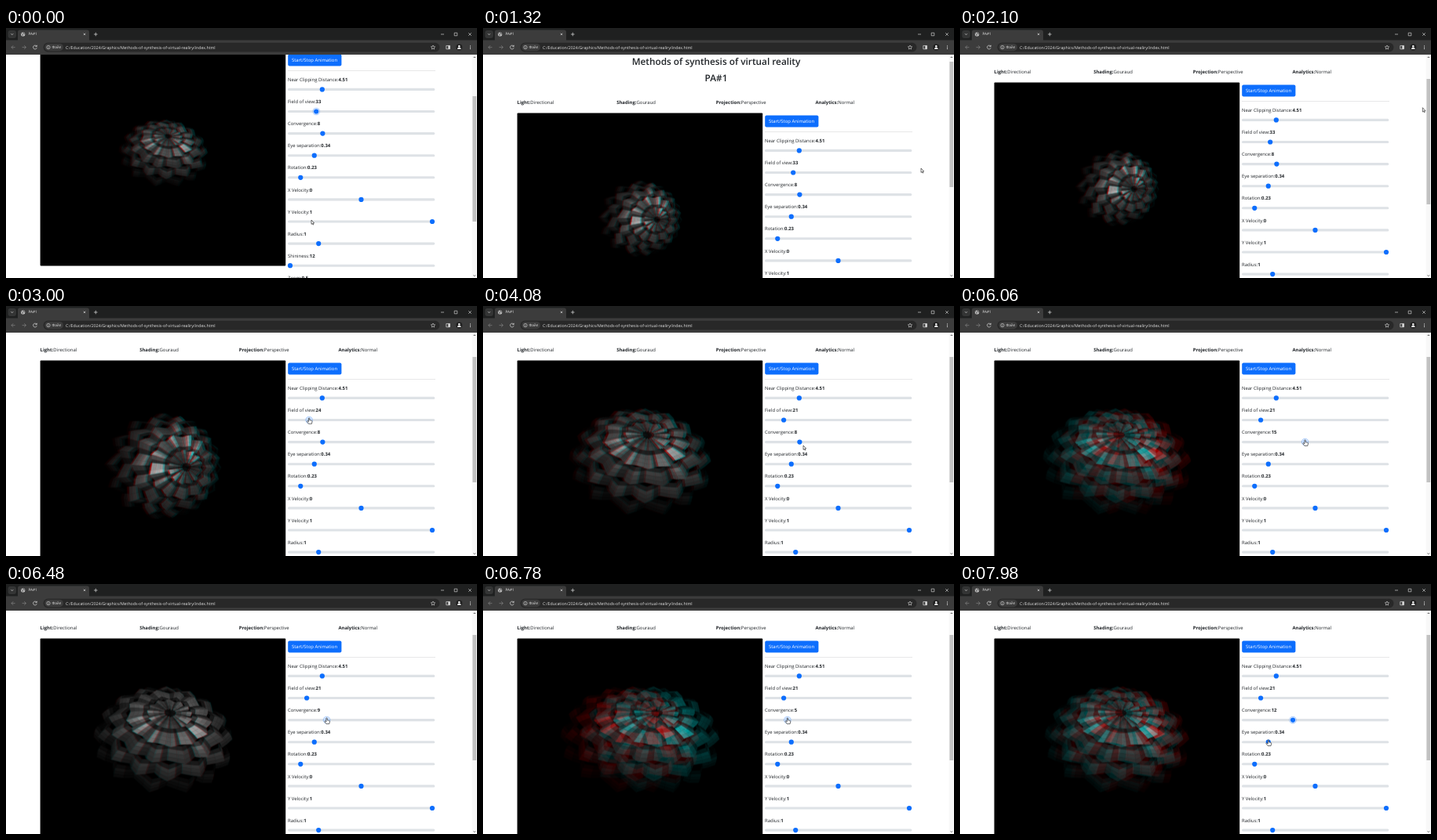
Recreate the animation shown at these times as an HTML page with a canvas. Size 600 by 319 pixels, loop 8000 ms.

```html
<!DOCTYPE html>
<html lang="en">
<head>
<meta charset="utf-8">
<title>PA#1</title>
<style>
html, body { margin: 0; width: 600px; height: 319px; overflow: hidden; background: #fff; }
body { position: relative; font: 5.95px "Open Sans", "Noto Sans", sans-serif; color: #212529; text-rendering: geometricPrecision; }
canvas, svg { position: absolute; left: 0; top: 0; }
#view { position: absolute; top: 34px; width: 600px; height: 285px; overflow: hidden; }
#page { position: absolute; top: -34px; }
.t { position: absolute; line-height: 0; white-space: pre; }
.t b { font-weight: 700; }
.head { width: 594px; text-align: center; font-size: 11.8px; font-weight: 600; }
.bar { color: #e3e3e3; font-size: 5.22px; }
.small { font-size: 4.7px; }
#tip { overflow: visible; }
#tip path { fill: #fff; stroke: #111; stroke-width: .6px; }
</style>
</head>
<body>
<canvas id="stage"></canvas>
<div id="view"><div id="page"></div></div>
<div id="chrome"></div>
<svg id="tip" width="1" height="1">
  <path id="arrow" d="M0 0V5.4L1.2 4.3L2.1 6.1L2.9 5.7L2.1 4H3.7Z"/>
  <path id="hand" d="M-.6 .1Q0-.6 .6 .1V2.6L3.3 3.2Q4 3.5 3.9 4.3L3.3 7.3H-.7L-2.8 4.3Q-2.6 3.3-1.7 3.8L-.6 4.7Z"/>
</svg>
<script>
const LOOP = 8000, W = 600, H = 319, TAU = Math.PI * 2;
const $ = id => document.getElementById(id);
const ctx = $('stage').getContext('2d');
const dpr = window.devicePixelRatio || 1;

function resize(canvas, w, h) {
  canvas.width = w * dpr;
  canvas.height = h * dpr;
  canvas.style.width = w + 'px';
  canvas.style.height = h + 'px';
}
resize($('stage'), W, H);

// --- timing ---------------------------------------------------------------
const within = (t, a, b) => t >= a && t < b;
const mix = (a, b, u) => a + (b - a) * u;
function ease(t, a, b) {
  const u = Math.min(1, Math.max(0, (t - a) / (b - a)));
  return u * u * (3 - 2 * u);
}

const scrollAt = t => 78 * (1 - ease(t, 780, 1260)) + 39 * ease(t, 1640, 2040);
const fovAt = t => Math.round(33 - 9 * ease(t, 2560, 3000) - 3 * ease(t, 3040, 3440));
const poseAt = t => ease(t, 240, 1140) - ease(t, 3000, 3480);
const swing = [[4440, 8], [4900, 15], [5360, 34], [6060, 15], [6780, 5], [7520, 12]];
function convAt(t) {
  let v = swing[0][1];
  for (let i = 1; i < swing.length; i++)
    v += (swing[i][1] - swing[i - 1][1]) * ease(t, swing[i - 1][0], swing[i][0]);
  return Math.round(v);
}

// --- text -----------------------------------------------------------------
function text(parent, x, y, label, cls = '', bold = '') {
  const el = document.createElement('div'), b = document.createElement('b');
  el.className = 't ' + cls;
  el.style.left = x + 'px';
  el.style.top = y + 'px';
  b.textContent = bold;
  el.append(label, b);
  parent.append(el);
  return b;
}

const page = $('page'), chrome = $('chrome');
text(page, 0, 43, 'Methods of synthesis of virtual reality', 'head');
text(page, 0, 64, 'PA#1', 'head');
['Light:Directional', 'Shading:Gouraud', 'Projection:Perspective', 'Analytics:Normal'].forEach((item, i) => {
  const [key, value] = item.split(':');
  text(page, 43.6 + i * 126.6, 95, '', '', key + ':').after(value);
});
text(page, 364, 119.4, 'Start/Stop Animation').parentNode.style.color = '#fff';

const rows = [
  ['Near Clipping Distance', 4.51, 0, 20], ['Field of view', 33, 0, 180], ['Convergence', 8, 0, 35],
  ['Eye separation', .34, 0, 2], ['Rotation', .23, 0, 3.14], ['X Velocity', 0, -1, 1],
  ['Y Velocity', 1, -1, 1], ['Radius', 1, 0, 5], ['Shininess', 12, 12, 100], ['Zoom', .5, 0, 1]
].map(([label, value, min, max], i) => {
  const y = 144 + i * 28.1;
  return { value, min, max, y: y + 12.4, out: text(page, 359, y, label + ':', '', value) };
});
const thumbX = r => 362 + 181 * (r.value - r.min) / (r.max - r.min);
function setRow(row, value) {
  if (row.value !== value) row.out.textContent = row.value = value;
}

text(chrome, 28.5, 8, 'PA#1', 'bar small');
text(chrome, 58.5, 24.6, 'Файл', 'bar small');
text(chrome, 76, 24.6, 'C:/Education/2024/Graphics/Methods-of-synthesis-of-virtual-realiry/index.html', 'bar');

// --- pointer --------------------------------------------------------------
const spot = (x, y) => () => [x, y];
const onBar = scroll => [597, 78 + scroll * .565];
const onThumb = i => scroll => [thumbX(rows[i]), rows[i].y - scroll - 2.5];
const rest = spot(389, 245), side = spot(558, 179), idle = spot(408, 178);
const route = [
  [0, rest], [240, rest], [760, onBar], [1260, onBar], [1320, side], [1440, side], [1640, onBar], [2040, onBar],
  [2560, onThumb(1)], [3480, onThumb(1)], [4060, idle], [4160, idle],
  [4440, onThumb(2)], [7640, onThumb(2)], [7940, onThumb(3)], [LOOP, onThumb(3)]
];
function pointerAt(t, scroll) {
  const i = route.findIndex(stop => stop[0] > t);
  const [t0, from] = route[i - 1], [t1, to] = route[i];
  const a = from(scroll), b = to(scroll), u = ease(t, t0, t1);
  return [mix(a[0], b[0], u), mix(a[1], b[1], u)];
}

// --- drawing helpers ------------------------------------------------------
function box(x, y, w, h, r, fill) {
  ctx.fillStyle = fill;
  ctx.beginPath();
  ctx.roundRect(x, y, w, h, r);
  ctx.fill();
}
const dot = (x, y, r, fill) => box(x - r, y - r, 2 * r, 2 * r, r, fill);
function line(d, color = '#dcdcdc', width = .7) {
  ctx.strokeStyle = color;
  ctx.lineWidth = width;
  ctx.stroke(new Path2D(d));
}

// --- model ----------------------------------------------------------------
const VIEW = { x: 43.6, y: 108.6, w: 312.6, h: 273 };
const eye = document.createElement('canvas'), ectx = eye.getContext('2d');
resize(eye, VIEW.w, VIEW.h);

const dotp = (a, b) => a[0] * b[0] + a[1] * b[1] + a[2] * b[2];
const cross = (a, b) => [a[1] * b[2] - a[2] * b[1], a[2] * b[0] - a[0] * b[2], a[0] * b[1] - a[1] * b[0]];
const minus = (a, b) => a.map((c, i) => c - b[i]);
const unit = v => { const l = Math.hypot(...v) || 1; return v.map(c => c / l); };
const rand = n => { const s = Math.sin(n * 12.9898) * 43758.5453; return s - Math.floor(s); };

const LIGHT = unit([.18, -.33, 1]);
const LOBES = 13, CUTS = 4, LAYERS = 5, STEPS = 4;

// A dome of pleated layers: each lobe is a ridge, deeper towards the hem.
function vertex(u, k, layer) {
  const lobe = Math.floor(k / CUTS) % LOBES;
  const ridge = 1 - Math.abs(2 * (k % CUTS) / CUTS - 1);
  const a = (k / CUTS + layer * .5 + .3 * rand(layer * 7 + lobe)) / LOBES * TAU;
  const r = .97 * Math.sin(u * 1.65) * (1 + (.05 + .13 * u) * (ridge - .5));
  const h = .68 - .8 * u ** 2.2 + .04 * ridge * (1 - u);
  return [r * Math.cos(a), r * Math.sin(a), h];
}

const facets = [];
for (let i = 0; i < LAYERS * STEPS; i++) {
  const u0 = i / (LAYERS * STEPS), u1 = (i + 1) / (LAYERS * STEPS), layer = Math.floor(i / STEPS);
  for (let k = 0; k < LOBES * CUTS; k++) {
    const crease = i % STEPS ? 1 : .45;
    const seam = k % CUTS ? 1 : .6;
    const petal = .8 + .4 * rand(layer * 31 + Math.floor(k / CUTS));
    facets.push({
      pts: [vertex(u0, k, layer), vertex(u0, k + 1, layer), vertex(u1, k + 1, layer), vertex(u1, k, layer)],
      tone: crease * seam * petal * (1 - .65 * u1 ** 3)
    });
  }
}

function poseFacets(p) {
  const axis = unit([mix(.13, .5, p), mix(-.62, .02, p), mix(.77, .86, p)]);
  const e1 = unit(minus([1, 0, 0], axis.map(c => c * axis[0])));
  const e2 = cross(axis, e1);
  const turn = v => axis.map((c, i) => e1[i] * v[0] + e2[i] * v[1] + c * v[2]);
  return facets.map(({ pts, tone }) => {
    const q = pts.map(turn);
    let n = unit(cross(minus(q[2], q[0]), minus(q[3], q[1])));
    if (dotp(n, q[2]) < 0) n = n.map(c => -c);
    const d = Math.max(0, dotp(n, LIGHT));
    return { pts: q, lum: (12 + 60 * d + 80 * d ** 28) * tone, z: q[0][2] + q[2][2] };
  }).sort((a, b) => a.z - b.z);
}

function drawEye(list, side, scale, conv, p) {
  ectx.setTransform(dpr, 0, 0, dpr, 0, 0);
  ectx.clearRect(0, 0, VIEW.w, VIEW.h);
  ectx.lineWidth = .4;
  for (const { pts, lum } of list) {
    ectx.beginPath();
    for (const [x, y, z] of pts) {
      const k = scale / (1 - z * .1);
      const shift = side * 1.7 * scale * (1 / (9.2 - z * .8) - 1 / conv);
      ectx.lineTo(157 + x * k + shift, 129 + 6 * p + y * k * .87);
    }
    ectx.closePath();
    ectx.fillStyle = ectx.strokeStyle = side > 0 ? `rgb(${lum},0,0)` : `rgb(0,${lum},${lum})`;
    ectx.fill();
    ectx.stroke();
  }
  ctx.drawImage(eye, VIEW.x, VIEW.y, VIEW.w, VIEW.h);
}

function drawModel(fov, conv, p) {
  const half = deg => Math.tan(deg * Math.PI / 360);
  const scale = 84 * half(21) / half(fov);
  const list = poseFacets(p);
  box(VIEW.x, VIEW.y, VIEW.w, VIEW.h, 1, '#000');
  ctx.globalCompositeOperation = 'lighter';
  for (const side of [1, -1]) drawEye(list, side, scale, conv, p);
  ctx.globalCompositeOperation = 'source-over';
}

// --- page and browser -----------------------------------------------------
function drawSlider(row, active, focus) {
  const x = thumbX(row), y = row.y;
  box(359, y - 1.55, 187.3, 3.1, 1.55, '#dee2e6');
  if (active || focus) {
    dot(x, y, 4.8, 'rgba(13,110,253,.3)');
    dot(x, y, 3.5, '#fff');
  }
  dot(x, y, 3.1, active ? '#b6d4fe' : '#0d6efd');
}

function drawScrollbar(scroll, held) {
  box(593.6, 34, 6.4, 285, 0, '#f8f8f8');
  box(594.4, 43 + scroll * .565, 4.8, 160, 0, held ? '#8a8a8a' : '#c1c1c1');
  line('M595.6 38L596.8 36.8L598 38M595.6 315.4L596.8 316.6L598 315.4', '#505050', 1);
}

function drawChrome() {
  box(0, 0, W, 34, 0, '#1f2020');
  box(0, 15.6, W, 18.4, 0, '#3c3c3c');
  box(15, 2.4, 91, 15, [3, 3, 0, 0], '#3c3c3c');
  box(2.6, 3, 10.4, 10, 3, '#343535');
  line('M6.4 7.2l1.4 1.5l1.4-1.5');
  dot(21.7, 8, 2.6, '#c7c7c7');
  line('M19.8 7.2l1.8 1l-.6 1.8M22.2 5.8l.4 1.6l1.4 .4', '#3c3c3c', .8);
  line('M98.8 6.7l2.4 2.4m0-2.4l-2.4 2.4M114.3 5.7v4.6M112 8h4.6');
  line('M554 8h4M571.2 6.2h3.6v3.6h-3.6zM589.2 6.2l3.6 3.6m0-3.6l-3.6 3.6', '#e8e8e8', .6);

  line('M11.6 24.6h-4.6m2.2-2.3l-2.3 2.3l2.3 2.3M20.6 24.6h4.8m-2.2-2.3l2.3 2.3l-2.3 2.3', '#858585');
  line('M39 23.2A2.4 2.4 0 1 0 39.3 25.4M39.3 21.8v1.9h-2');
  box(47.5, 18.8, 505, 11.6, 5.8, '#282828');
  box(49.3, 20, 23.7, 9.2, 4.6, '#3c3c3c');
  line('M51.8 24.6a2.2 2.2 0 1 0 4.4 0a2.2 2.2 0 1 0-4.4 0M54 24.3v1.6M54 23.2v.5', '#dcdcdc', .6);

  ctx.beginPath();
  for (let i = 0; i < 10; i++) {
    const a = i * TAU / 10 - TAU / 4, r = i % 2 ? 1.3 : 2.8;
    ctx.lineTo(544 + r * Math.cos(a), 24.8 + r * Math.sin(a));
  }
  ctx.closePath();
  ctx.stroke();
  line('M560.8 22.6h4.6v4.2h-4.6z');
  box(563.3, 22.5, 2.3, 4.4, 0, '#dcdcdc');
  dot(577.3, 24.6, 4, '#202020');
  dot(577.3, 23.4, 1.3, '#f0f0f0');
  box(575, 25, 4.6, 2, [1.6, 1.6, 0, 0], '#f0f0f0');
  for (let i = -1; i < 2; i++) dot(591.5, 24.6 + i * 1.8, .55, '#e3e3e3');
}

function draw(t) {
  const scroll = scrollAt(t), fov = fovAt(t), conv = convAt(t);
  const dragFov = within(t, 2560, 3480), dragConv = within(t, 4440, 7600);
  setRow(rows[1], fov);
  setRow(rows[2], conv);

  ctx.setTransform(dpr, 0, 0, dpr, 0, 0);
  box(0, 0, W, H, 0, '#fff');
  ctx.translate(0, -scroll);
  drawModel(fov, conv, poseAt(t));
  box(359.2, 111.5, 68.2, 15, 2, '#0d6efd');
  box(359, 132.3, 188, .5, 0, '#cfd0d2');
  rows.forEach((row, i) => drawSlider(row,
    i === 1 && dragFov || i === 2 && dragConv,
    i === 1 && t < 600 || i === 2 && t >= 7600));
  ctx.translate(0, scroll);
  drawScrollbar(scroll, within(t, 780, 1260) || within(t, 1640, 2040));
  drawChrome();
  page.style.transform = `translateY(${-scroll}px)`;

  const pointing = dragFov || within(t, 4440, 7700) || t >= 7900;
  const [x, y] = pointerAt(t, scroll);
  $('arrow').style.display = pointing ? 'none' : '';
  $('hand').style.display = pointing ? '' : 'none';
  $('tip').style.transform = `translate(${x}px, ${y}px)`;
}

const start = performance.now();
function tick() {
  draw((performance.now() - start) % LOOP);
  requestAnimationFrame(tick);
}
tick();
</script>
</body>
</html>
```
